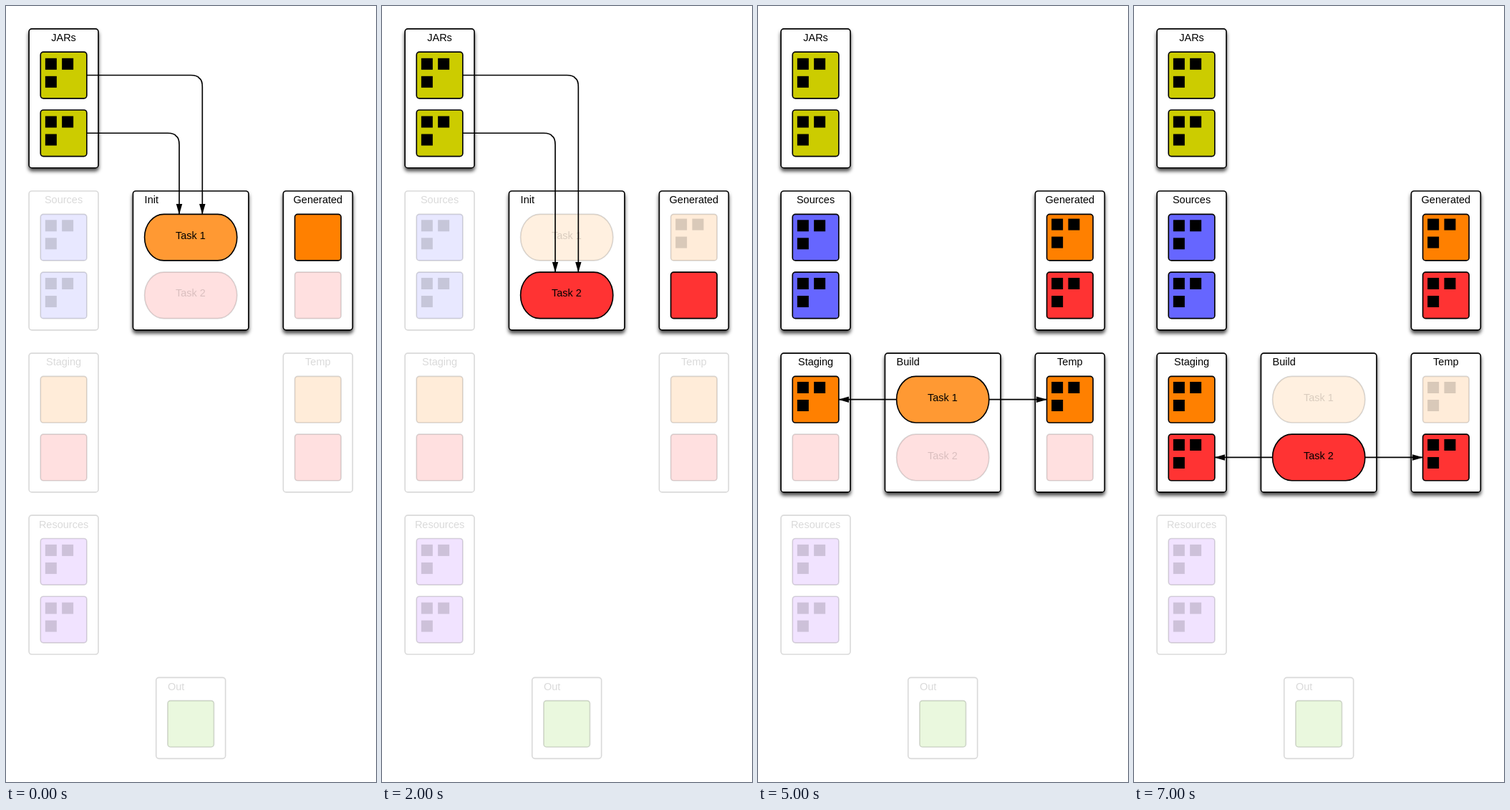
An HTML page that plays this animation: 517x1082 px, repeating every 8 s.

```html
<!DOCTYPE html>
<html lang="en">
<head>
<meta charset="utf-8">
<title>Build steps</title>
<style>
html, body { margin: 0; width: 100%; height: 100%; overflow: hidden; background: #fff; }
svg { display: block; width: 517px; height: 1082px; }
text { font: 14.5px "Liberation Sans", Arial, sans-serif; fill: #000; }
rect, .line { stroke: #000; stroke-width: 1.65; }
.line { fill: none; marker-end: url(#head); }
.bit { stroke: none; fill: #000; }
.lit { filter: url(#shadow); }
.dim { fill-opacity: .15; stroke-opacity: .15; }
.pane { fill: #fff; fill-opacity: 1; }
</style>
</head>
<body>
<svg viewBox="0 0 517 1082">
  <defs>
    <filter id="shadow" x="-20%" y="-20%" width="140%" height="140%">
      <feDropShadow dx="0" dy="4" stdDeviation="2.6" flood-color="#000" flood-opacity=".7"/>
    </filter>
    <marker id="head" markerUnits="userSpaceOnUse" markerWidth="16" markerHeight="10"
      refX="14.5" refY="5" orient="auto" viewBox="0 0 16 10">
      <path d="M0 .7 L15 5 L0 9.3 Z"/>
    </marker>
  </defs>
  <g id="scene" transform="translate(-.2 -.4)"></g>
</svg>
<script>
const U = 16.15;               // layout grid
const STEP = 1000, STEPS = 8;
const ORANGE = '#ff8000', RED = '#ff3333', PEACH = '#ff9933';
const YELLOW = '#cccc00', BLUE = '#6666ff', PURPLE = '#9f46ff', GREEN = '#70cc22';
const scene = document.getElementById('scene');

const dim = on => on ? '' : 'dim';

function rect(x, y, w, h, cls, rx, ry, fill) {
  return `<rect x="${x}" y="${y}" width="${w}" height="${h}" rx="${rx}" ry="${ry}" class="${cls}"` +
    (fill ? ` fill="${fill}"` : '') + '/>';
}

function label(x, y, str, on, anchor = 'middle') {
  return `<text x="${x}" y="${y}" text-anchor="${anchor}" class="${dim(on)}">${str}</text>`;
}

function pane(col, row, w, h, title, on, left) {
  const x = col * U, y = row * U;
  return rect(x, y, w * U, h * U, 'pane ' + (on ? 'lit' : 'dim'), 4, 4) +
    label(left ? x + U : x + w * U / 2, y + 17.4, title, on, left ? 'start' : 'middle');
}

// A box; dy is the centre of its upper bits, 0 for an empty box.
function box(col, row, fill, on, dy) {
  const x = col * U, y = row * U;
  let out = rect(x, y, 4 * U, 4 * U, dim(on), 4, 4, fill);
  if (dy) for (const [i, j] of [[0, 0], [23.3, 0], [0, 25]])
    out += rect(x + 6.6 + i, y + dy - 8 + j, 16, 16, 'bit ' + dim(on), 0, 0);
  return out;
}

// A pane with two boxes; each box is [fill, on, dy].
function store(col, row, title, on, a, b) {
  return pane(col, row, 6, 12, title, on) +
    box(col + 1, row + 2, ...a) + box(col + 1, row + 7, ...b);
}

function task(row, name, fill, on) {
  const y = row * U;
  return rect(12 * U, y, 8 * U, 4 * U, dim(on), 27, 2 * U, fill) +
    label(16 * U - .3, y + 34.4, name, on);
}

function stage(row, title, first) {
  return pane(11, row, 10, 12, title, true, true) +
    task(row + 2, 'Task 1', PEACH, first) + task(row + 7, 'Task 2', RED, !first);
}

const line = d => `<path class="line" d="${d}"/>`;

// From a box edge sideways, round a corner, then down.
function bend(fromCol, row, x, endRow) {
  const dir = Math.sign(x - fromCol * U);
  return line(`M${fromCol * U} ${row * U} H${x - dir * U} ` +
    `Q${x - dir * U * .42} ${row * U} ${x - dir * U * .26} ${row * U + U * .26} ` +
    `Q${x} ${row * U + U * .42} ${x} ${(row + 1) * U} V${endRow * U}`);
}

const across = (fromCol, toCol, row) => line(`M${fromCol * U} ${row * U} H${toCol * U}`);

function arrows(build, first, write) {
  const base = build ? 32 : 18, end = base + (first ? 0 : 5), mid = end + 2;
  if (write) return across(20, 25, mid) + (build ? across(12, 7, mid) : '');
  if (!build) return bend(7, 6, 17 * U, end) + bend(7, 11, 15 * U, end);
  let out = bend(7, 6, 16.5 * U, end) + bend(7, 11, 15.5 * U, end) +
    bend(7, 20, 234.4, end) + bend(7, 25, 219.7, end) +
    bend(25, 20, 17.5 * U, end) + bend(25, 25, 297.4, end);
  if (!first) out += line(`M${7 * U} ${34 * U} H146 Q162.5 ${34 * U} 173 561 L207.8 601.4`);
  return out;
}

function draw(step) {
  const build = step >= 4, first = step % 4 < 2, write = step % 2 === 1;
  const gen1 = step >= 1, gen2 = step >= 3;
  const out1 = step >= 5, out2 = step >= 7;
  const second = build && !first;
  scene.innerHTML =
    store(2, 2, 'JARs', true, [YELLOW, true, 16.6], [YELLOW, true, 16.6]) +
    store(2, 16, 'Sources', build, [BLUE, build, 16], [BLUE, build, 16]) +
    store(24, 16, 'Generated', true,
      [ORANGE, build || first, gen1 && 14.3], [RED, build || !first, gen2 && 16]) +
    store(2, 30, 'Staging', build,
      [ORANGE, build, out1 && 15.6], [RED, second, out2 && 14.8]) +
    store(24, 30, 'Temp', build,
      [ORANGE, build && first, out1 && 15.6], [RED, second, out2 && 14.8]) +
    store(2, 44, 'Resources', false, [PURPLE, false, 16.4], [PURPLE, false, 16.4]) +
    pane(13, 58, 6, 7, 'Out', false, true) + box(14, 60, GREEN, false, 0) +
    stage(build ? 30 : 16, build ? 'Build' : 'Init', first) +
    arrows(build, first, write);
}

let shown = -1;
const start = performance.now();
function tick() {
  const step = Math.floor((performance.now() - start) / STEP) % STEPS;
  if (step !== shown) draw(shown = step);
  requestAnimationFrame(tick);
}
tick();
</script>
</body>
</html>
```
